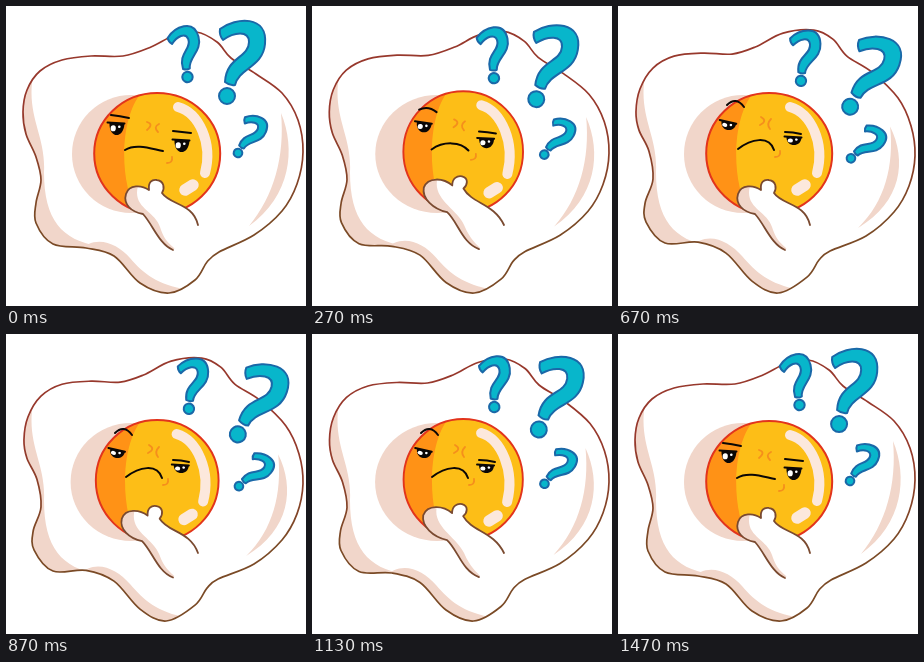
Animation of 300 by 300 pixels, one loop 1.51 s. Source, as an HTML page:

```html
<!DOCTYPE html>
<html lang="en">
<head>
<meta charset="utf-8">
<title>Thinking egg</title>
<style>
html, body { margin: 0; height: 100%; overflow: hidden; background: #fff; }
svg { display: block; width: 100%; height: 100%; }
path { fill: none; stroke-linecap: round; stroke-linejoin: round; }
.shade { fill: #f1d6ca; }
.white { fill: #fff; }
.black { fill: #0b0706; }
.ink { stroke: #0b0706; stroke-width: 2; }
.blush { stroke: #f58f1c; stroke-width: 1.8; }
.gloss { stroke: #fce8dc; }
#question * { fill: #08b6cb; stroke: #1a68a8; stroke-width: 2; vector-effect: non-scaling-stroke; }
</style>
</head>
<body>
<svg viewBox="0 0 300 300">
  <defs>
    <linearGradient id="rim" x2="0" y2="1">
      <stop offset=".3" stop-color="#97382c"/>
      <stop offset=".7" stop-color="#7a4a26"/>
    </linearGradient>
    <clipPath id="inWhite"><path id="whiteClip"/></clipPath>
    <clipPath id="inYolk"><ellipse cx="151" cy="147.5" rx="63" ry="60.5"/></clipPath>
    <clipPath id="inHand"><path id="handClip"/></clipPath>
    <g id="question">
      <path d="M-7 -67C9 -79 41 -81 38 -52C36 -29 12 -28 8 -11Q3 -10 -2 -14C-1 -39 22 -38 22 -54C22 -66 7 -64 -4 -56Q-8 -61 -7 -67Z"/>
      <circle r="8"/>
    </g>
  </defs>

  <path id="white" class="white"/>
  <g clip-path="url(#inWhite)">
    <path class="shade" d="M27 70C20 110 40 130 38 166C38 214 56 234 92 240L60 262H0V70Z"/>
    <path class="shade" id="foot"/>
    <path class="shade" id="side"/>
  </g>
  <path id="edge" stroke="url(#rim)" stroke-width="1.7"/>
  <ellipse id="halo" class="shade" cx="125" cy="148" ry="59"/>

  <g id="yolk">
    <ellipse cx="151" cy="147.5" rx="63" ry="60.5" fill="#fdbe17"/>
    <path clip-path="url(#inYolk)" style="fill:#ff9216" d="M136 86C112 112 112 185 136 214H80V86Z"/>
    <ellipse cx="151" cy="147.5" rx="63" ry="60.5" fill="none" stroke="#e2341c" stroke-width="2"/>
  </g>
  <path class="gloss" id="glossArc" stroke-width="10"/>
  <path class="gloss" id="glossSpot" stroke-width="11.5"/>

  <path class="blush" id="creaseL"/>
  <path class="blush" id="creaseR"/>
  <path class="blush" id="cheek"/>
  <path class="ink" id="browL"/>
  <path class="ink" id="browR"/>
  <path class="ink" id="mouth"/>
  <g id="eyeL"></g>
  <g id="eyeR"></g>

  <path id="hand" class="white"/>
  <path id="palm" class="shade" clip-path="url(#inHand)"/>
  <path id="handEdge" stroke="#7a4a30" stroke-width="1.8"/>

  <use class="mark" href="#question"/>
  <use class="mark" href="#question"/>
  <use class="mark" href="#question"/>
</svg>
<script>
const LOOP = 1510;
const $ = id => document.getElementById(id);
const lerp = (a, b, u) => a + (b - a) * u;
const ease = (t, from, to) => {
  const x = Math.min(1, Math.max(0, (t - from) / (to - from)));
  return (1 - Math.cos(Math.PI * x)) / 2;
};

// Blends two strings that differ only in their numbers.
function blend([a, b], u) {
  const target = b.match(/-?[\d.]+/g);
  let i = 0;
  return a.replace(/-?[\d.]+/g, n => lerp(+n, +target[i++], u).toFixed(2));
}

// Closed smooth curve through "x,y" points.
function smooth(text) {
  const pts = text.split(' ').map(p => p.split(',').map(Number));
  const at = i => pts[(i + pts.length) % pts.length];
  const handle = (i, k) => at(i).map((v, c) => v + k * (at(i + 1)[c] - at(i - 1)[c]) / 6);
  return 'M' + at(0) + pts.map((_, i) =>
    'C' + [handle(i, 1), handle(i + 1, -1), at(i + 1)]).join('') + 'Z';
}

const WHITE = [
  '17,106 21,84 34,65 56,54 85,50 117,50 145,41 167,30 190,26 211,36 225,52 250,68 276,87 292,114 297,146 291,178 276,205 248,229 213,246 201,256 189,274 163,287 134,277 108,250 80,242 47,238 30,217 30,197 35,174 30,151 20,128',
  '18,106 22,83 35,62 56,50 85,47 114,48 137,41 165,27 196,24 215,33 229,50 254,66 280,92 293,120 297,150 291,180 276,206 248,230 212,245 201,254 189,271 160,287 134,275 108,247 80,236 47,237 28,216 27,197 35,173 31,145 21,124'
];
const FOOT = [
  'M72 246C88 228 110 236 124 252S150 278 182 284L140 300Z',
  'M72 242C88 224 110 234 124 250S150 278 182 284L140 300Z'
];
const SIDE = [
  'M275 107C290 143 285 190 243 220C268 190 279 150 275 107Z',
  'M272 121C289 155 284 196 240 222C267 196 276 160 272 121Z'
];
const HAND = [
  'M167 244C153 238 147 219 137 208C125 206 117 198 120 188C123 178 136 179 143 184C142 176 146 173 151 174C158 175 159 182 156 187C164 199 187 197 192 219',
  'M167 243C150 237 146 216 135 206C121 203 109 192 111 181C115 170 131 171 140 179C140 172 145 169 150 170C157 172 155 179 151 182C160 198 181 197 192 219'
];
const PALM = [
  'M132 180C126 202 149 205 154 221S165 238 170 244L140 250L110 205L115 180Z',
  'M125 171C119 192 145 203 152 219S165 238 170 244L140 250L102 200L108 172Z'
];
const GLOSS_ARC = ['M172 101C193 107 207 137 199 167', 'M169 99C189 105 203 137 195 168'];
const GLOSS_SPOT = ['M179 184L187 179', 'M177 187L185 182'];
const BROW_L = ['M105 109Q114 110 123 112', 'M109 99Q118 90 126 101'];
const BROW_R = ['M167 125Q176 126 185 127', 'M167 126Q175 126 183 128'];
const MOUTH = ['M119 144C130 137 146 143 157 145', 'M120 143C133 133 151 129 156 144'];
const CREASE_L = ['M141 116Q148 118 141 124', 'M143 111Q150 115 142 119'];
const CREASE_R = ['M153 118Q147 121 152 126', 'M153 113Q148 118 152 123'];
const CHEEK = ['M166 151Q167 157 161 157', 'M162 145Q163 151 157 151'];

// Dot position and tilt at both ends of the swing, then size.
const MARKS = [
  ['221 90 0', '232.5 101 14', 1],
  ['181.5 71 -21', '183 75 -8', 0.65],
  ['232 147 17', '233 152.5 32', 0.54]
];
const marks = document.querySelectorAll('.mark');

const eye = depth => `
  <path class="black" d="M-7 0C-7 ${depth * 1.33} 8 ${depth * 1.33} 8 0Z"/>
  <ellipse class="white" cx="-3" cy="${depth * .46}" rx="2.6" ry="${depth * .25}"/>
  <circle class="white" cx="3" cy="${depth * .3}" r="1.3"/>
  <path class="ink" d="M-9 0H8"/>`;

function draw(t) {
  const swing = Math.sin(Math.PI * t / LOOP) ** 2;
  const rub = ease(t, 0, 335) - ease(t, 335, 670) + ease(t, 670, 1090) - ease(t, 1090, 1480);
  const doubt = ease(t, 130, 400) - ease(t, 1130, 1440);
  const set = (id, poses, u) => $(id).setAttribute('d', blend(poses, u));
  const place = (id, x, y, turn) =>
    $(id).setAttribute('transform', `translate(${x} ${y}) rotate(${turn})`);

  const white = smooth(blend(WHITE, swing));
  for (const id of ['white', 'edge', 'whiteClip']) $(id).setAttribute('d', white);
  set('foot', FOOT, swing);
  set('side', SIDE, swing);

  $('halo').setAttribute('rx', lerp(59, 62, rub));
  $('yolk').setAttribute('transform',
    `translate(151.2 ${lerp(147.5, 145.5, rub)}) scale(${lerp(1, .945, rub)} 1) translate(-151 -147.5)`);
  set('glossArc', GLOSS_ARC, rub);
  set('glossSpot', GLOSS_SPOT, rub);
  for (const id of ['hand', 'handEdge', 'handClip']) set(id, HAND, rub);
  set('palm', PALM, rub);

  set('browL', BROW_L, doubt);
  set('browR', BROW_R, doubt);
  set('mouth', MOUTH, doubt);
  set('creaseL', CREASE_L, doubt);
  set('creaseR', CREASE_R, doubt);
  set('cheek', CHEEK, doubt);
  $('eyeL').innerHTML = $('eyeR').innerHTML = eye(lerp(12, 8, doubt));
  place('eyeL', 110.5 + 1.5 * rub, lerp(117, 116, doubt), lerp(3, 13, doubt));
  place('eyeR', 175.5 - 1.5 * rub, lerp(134, 131, doubt), 3);

  MARKS.forEach(([from, to, size], i) => {
    const [x, y, tilt] = blend([from, to], swing).split(' ');
    marks[i].setAttribute('transform', `translate(${x} ${y}) rotate(${tilt}) scale(${size})`);
  });
}

const start = performance.now();
function tick() {
  draw((performance.now() - start) % LOOP);
  requestAnimationFrame(tick);
}
tick();
</script>
</body>
</html>
```
